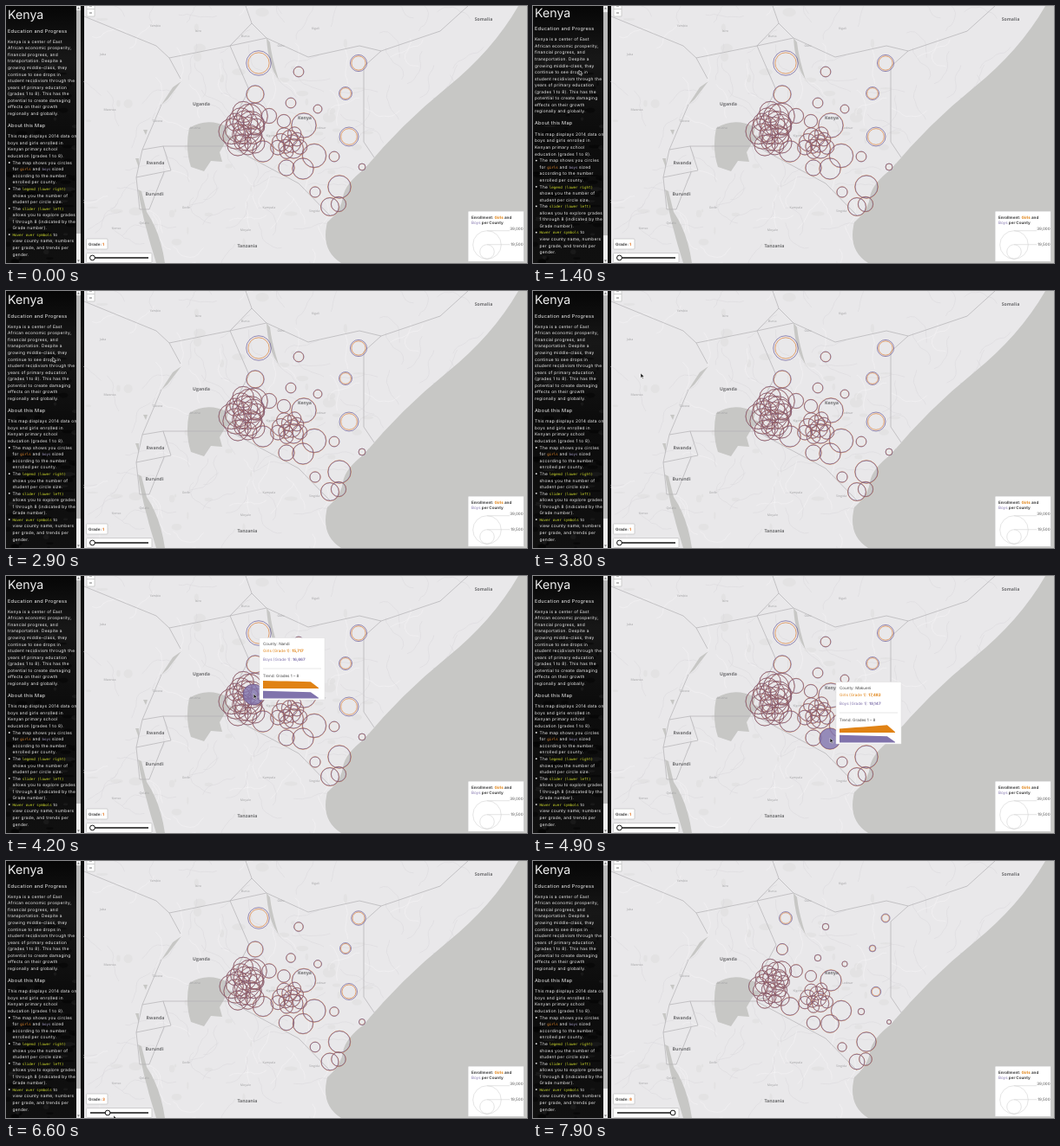
Write an HTML page that moves like this. It is 600 by 297 pixels and loops after 8000 ms.

```html
<!DOCTYPE html>
<html lang="en">
<head>
<meta charset="utf-8">
<title>Kenya: Education and Progress</title>
<style>
html, body { margin: 0; width: 100%; height: 100%; overflow: hidden; background: #000 }
svg { display: block; width: 600px; height: 297px; font-family: Inter, sans-serif; text-rendering: geometricPrecision }
.side { fill: #f0f0f0; font-size: 4.85px; letter-spacing: .25px }
.side .title { font-size: 14.2px; letter-spacing: 0 }
.side .h { font-size: 5.6px }
.side .small { font-size: 3.8px; letter-spacing: .1px }
.code { font: 4.2px "DejaVu Sans Mono", monospace; letter-spacing: 0 }
.place { font: 3.6px "Open Sans", sans-serif; fill: #a0a0a2; text-anchor: middle }
.country { font: bold 5.2px "Open Sans", sans-serif; fill: #6d6d6f; text-anchor: middle }
.water { fill: #c7c7c5 }
.line { fill: none; stroke-linejoin: round }
.box { fill: #fff; stroke: #c4c4c4; stroke-width: .8 }
.b { font-weight: 700 }
.girls { fill: #e08214 }
.boys { fill: #8073ac }
.ring { fill-opacity: 0; stroke-width: .9; stroke-opacity: .7 }
.ring.girls { stroke: #dd7626 }
.ring.boys { stroke: #5f4f92 }
.on { fill-opacity: .8 }
.ui { font-size: 4.55px; fill: #444 }
</style>
</head>
<body>
<svg viewBox="0 0 600 297">
  <defs>
    <linearGradient id="rock" x2="0" y2="1">
      <stop offset="0" stop-color="#060606"/><stop offset=".2" stop-color="#171717"/>
      <stop offset=".5" stop-color="#0c0c0c"/><stop offset="1" stop-color="#101010"/>
    </linearGradient>
    <clipPath id="panel"><path d="M0 0H81V297H0z"/></clipPath>
  </defs>
  <path fill="#e9e8ea" d="M90 0H600V297H90z"/>
  <g id="terrain"></g>
  <g class="water">
    <path d="M590 0Q560 52 508 94T412 189Q390 206 388 221T370 250Q362 282 386 297H600V0z"/>
    <path d="M211 141Q232 128 256 140L254 149 266 152 253 157 246 169 249 180 236 179 228 191 213 186Q206 165 211 141z"/>
    <path d="M300 37Q302 70 314 85 306 60 304 42z"/>
    <path d="M152 212Q158 250 173 297H183Q178 262 162 238L156 214z"/>
    <path d="M202 87 186 108 179 114 192 94zM158 143h5l-2 6zM149 176h4v11z"/>
  </g>
  <g class="line" stroke="#b2b1b4" stroke-width=".7">
    <path d="M256 142 280 97 258 46 300 37 348 59 407 46 432 52 412 70V157L424 175M432 52 500 29 532 0"/>
    <path d="M90 12 173 46 188 60 258 46 283 20 300 37M188 60 201 84M179 114 157 166 181 162H257L337 205 373 242"/>
    <path d="M181 162 190 190 150 198 157 166M150 198 154 235 165 235 182 192M283 20 276 0"/>
  </g>
  <g id="labels"></g>
  <g id="rings"></g>
  <g class="ui">
    <path class="box" d="M93 -4h9v16h-9zM93 3.5h9"/>
    <path stroke="#555" stroke-width=".8" d="M96 8h3M96 0h3"/>
    <rect class="box" x="92.5" y="269" width="24.5" height="12" rx="1"/>
    <text class="b" x="95" y="277">Grade: <tspan id="grade" fill="#e06a10"></tspan></text>
    <rect class="box" x="92.5" y="285.5" width="75.5" height="11" rx="1"/>
    <path stroke="#111" stroke-width="1.3" d="M97 291H164"/>
    <circle id="knob" cy="291" r="2.9" fill="#fff" stroke="#111"/>
    <rect class="box" x="532" y="237" width="64.5" height="58.5" rx="1"/>
    <text class="b" x="536" y="245.6">Enrollment: <tspan class="girls">Girls</tspan> and</text>
    <text x="536" y="252.2"><tspan class="boys">Boys</tspan> <tspan class="b">per County</tspan></text>
    <g class="line" stroke="#d2d2d2" stroke-width=".6">
      <circle cx="554" cy="276" r="16.3"/><circle cx="554" cy="284" r="8.3"/>
      <path d="M554 259.7H580M554 275.7H580"/>
    </g>
    <g text-anchor="end" fill="#555"><text x="595.5" y="259.4">39,000</text><text x="595.5" y="276.6">19,500</text></g>
  </g>
  <g id="tip" class="ui">
    <path fill="#fff" stroke="#ddd" stroke-width=".5" d="M0 0H75V71.5H0z"/>
    <text id="county" x="4" y="8"></text>
    <text class="girls" x="4" y="16.8">Girls (Grade 1): <tspan id="girlCount" class="b"></tspan></text>
    <text class="boys" x="4" y="26">Boys (Grade 1): <tspan id="boyCount" class="b"></tspan></text>
    <path stroke="#ccc" stroke-width=".5" d="M4 35.5H71"/>
    <text x="4" y="45.4">Trend: Grades 1 – 8</text>
    <path id="girlTrend" class="girls"/><path id="boyTrend" class="boys"/>
  </g>
  <path fill="url(#rock)" d="M0 0H89V297H0z"/>
  <g id="rocks"></g>
  <g clip-path="url(#panel)"><g id="side" class="side"></g></g>
  <path fill="#ececec" d="M81 0H86V297H81z"/>
  <path fill="#777" d="M82 3.4l1.5 -2 1.5 2zM82 293.6l1.5 2 1.5 -2z"/>
  <rect id="thumb" x="81" width="5" height="258" fill="#b9b9b9"/>
  <path id="cursor" d="M0 0V5.6L1.4 4.4 2.3 6.4 3.2 6 2.3 4.1H4z" fill="#111" stroke="#fff" stroke-width=".5"/>
</svg>
<script>
const $ = id => document.getElementById(id);
const add = (parent, tag, attrs, html = '') => {
  const el = document.createElementNS('http://www.w3.org/2000/svg', tag);
  for (const k in attrs) el.setAttribute(k, attrs[k]);
  el.innerHTML = html;
  return parent.appendChild(el);
};
let seed = 11;
const rnd = (a, b) => a + (b - a) * ((seed = seed * 16807 % 2147483647) / 2147483647);
const mix = (a, b, u) => a + (b - a) * u;

// Basemap: parks, roads and place names
const blob = (id, n, x, y, rx, ry, fill, opacity) => {
  while (n--) add($(id), 'ellipse', { cx: rnd(...x), cy: rnd(...y), rx: rnd(1, rx), ry: rnd(1, ry), fill, opacity });
};
blob('terrain', 45, [95, 420], [0, 297], 8, 6, '#e0e0e0', .7);
for (let i = 0; i < 120; i++) {
  let x = rnd(90, 520), y = rnd(0, 297), turn = rnd(0, 6.3), d = `M${x} ${y}`;
  for (let k = 0; k < 9; k++) {
    turn += rnd(-.6, .6);
    d += `L${x += 5 * Math.cos(turn)} ${y += 5 * Math.sin(turn)}`;
  }
  add($('terrain'), 'path', { d, class: 'line', stroke: i % 3 ? '#d8d7da' : '#f6f5f7', 'stroke-width': .5 });
}
const label = (cls, s, x, y) => add($('labels'), 'text', { class: cls, x, y: y + 1.7 }, s);
[['Somalia', 550, 15], ['Kenya', 344, 129], ['Uganda', 225, 113], ['Rwanda', 172, 181],
  ['Burundi', 171, 217], ['Tanzania', 278, 277]].forEach(c => label('country', ...c));
'Juba Yambio Isiro Bunia Gulu Kigali Mwanza Tabora Arusha Dodoma Kigoma Lodwar Konso Qelafo Gode Moyale Kampala Singida'
  .split(' ').forEach((s, i) => label('place', s, 120 + i % 6 * 48 + rnd(-12, 12), 35 + (i / 6 | 0) * 105 + rnd(-22, 22)));

// County rings: a few landmarks per region, dense clusters on a spiral
const rings = [];
const ring = (cx, cy, r, region, county) => {
  const circle = cls => add($('rings'), 'circle', { class: 'ring ' + cls, cx, cy });
  rings.push({ cx, cy, r, region, county, girl: circle('girls'), boy: circle('boys') });
};
const spiral = (n, cx, cy, rx, ry, rMin, rMax, region) => {
  for (let i = 0; i < n; i++) {
    const d = Math.sqrt((i + .5) / n), a = 2.4 * i;
    ring(cx + rx * d * Math.cos(a), cy + ry * d * Math.sin(a), rnd(rMin, rMax), region);
  }
};
// shrink: radius left at grade 8; share: girls' radius relative to boys'
const north = { shrink: .52, share: .85 }, dry = { shrink: .64, share: .95 };
const east = { shrink: .85, share: 1.03 }, west = { shrink: .76, share: .99 };
[[291, 66, 14.3], [406, 66, 9.6], [391, 101, 7.5], [395, 151, 11]].forEach(p => ring(...p, north));
[[337, 76, 6], [328, 112, 6], [359, 119, 5], [287, 102, 10.3], [378, 174, 6], [410, 186, 4]].forEach(p => ring(...p, dry));
[[384, 209, 13], [383, 229, 8.5], [373, 232, 10.3], [356, 215, 6], [355, 173, 13.5], [343, 138, 14], [323, 187, 9],
  [296, 168, 12], [320, 133, 7.5], [303, 127, 8.5]].forEach(p => ring(...p, east));
spiral(11, 326, 159, 15, 13, 7, 13, east);
spiral(19, 275, 144, 16, 24, 9, 16, west);
ring(285, 137, 12, west, { name: 'Nandi', girls: '15,717', boys: '16,667', start: 9, slope: -.2 });
ring(342, 188, 12, east, { name: 'Makueni', girls: '17,482', boys: '19,147', start: 4.5, slope: .7 });

// Sidebar
blob('rocks', 70, [0, 81], [60, 297], 8, 3, '#000', .4);
blob('rocks', 30, [0, 81], [60, 297], 8, 3, '#333', .3);
const row = (x, y, html, cls = '') => add($('side'), 'text', { x, y: y + 1.8, class: cls }, html);
const code = (s, color = '#d3e02c') => `<tspan class="code" fill="${color}">${s}</tspan>`;
const rows = (x, y, list) => list.forEach((s, i) => {
  if (s[0] === '*') add($('side'), 'circle', { cx: 3.8, cy: y + 7.55 * i, r: .9 });
  row(x, y + 7.55 * i, s.replace('*', ''));
});
row(2, 13.4, 'Kenya', 'title');
row(2, 29, 'Education and Progress', 'h');
rows(2, 41, ['Kenya is a center of East', 'African economic prosperity,', 'financial progress, and', 'transportation. Despite a',
  'growing middle-class, they', 'continue to see drops in', 'student recidivism through the', 'years of primary education',
  '(grades 1 to 8). This has the', 'potential to create damaging', 'effects on their growth', 'regionally and globally.']);
row(2, 138, 'About this Map', 'h');
rows(2, 150.5, ['This map displays 2014 data on', 'boys and girls enrolled in', 'Kenyan primary school', 'education (grades 1 to 8).']);
rows(7.5, 181, ['*The map shows you circles', `for ${code('girls', '#f09030')} and ${code('boys', '#a59cc4')} sized`,
  'according to the number', 'enrolled per county.', `*The ${code('legend (lower right)')}`, 'shows you the number of',
  'student per circle size.', `*The ${code('slider (lower left)')}`, 'allows you to explore grades', '1 through 8 (indicated by the',
  'Grade number).', `*${code('Hover over symbols')} to`, 'view county name, numbers', 'per grade, and trends per', 'gender.']);
['Map authored by Ned Harrowfield', 'References here', 'Data here'].forEach((s, i) => row(6, 305.5 + 6 * i, s, 'small'));

// Cursor stops: time, x, y
const stops = [[0, 68, 62], [1100, 53, 74], [3600, 54, 77], [4150, 285, 136], [4400, 287, 137], [4800, 342, 187],
  [5350, 343, 190], [6100, 101, 291], [6250, 104, 292], [6600, 124, 294], [7050, 164, 296], [8000, 166, 298]];
const ease = (t, a, b) => { const u = Math.min(1, Math.max(0, (t - a) / (b - a))); return u * u * (3 - 2 * u); };
const move = (id, x, y) => $(id).setAttribute('transform', `translate(${x} ${y})`);
const trend = (base, { start, slope }) => {
  let d = `M4 ${base}`;
  for (let i = 0; i < 8; i++) d += `L${4 + i * 64 / 7} ${base - (i < 7 ? start + slope * i : .8)}`;
  return d + `V${base}z`;
};

function draw() {
  const t = performance.now() % 8000;
  const scroll = ease(t, 1300, 1900) - ease(t, 2600, 2860);
  move('side', 0, -32 * scroll);
  $('thumb').setAttribute('y', 5 + 28 * scroll);

  const k = stops.findIndex(s => s[0] > t), [a, b] = [stops[k - 1], stops[k]];
  const u = ease(t, a[0], b[0]), x = mix(a[1], b[1], u), y = mix(a[2], b[2], u);
  move('cursor', x, y);
  $('cursor').style.display = t < 100 ? 'none' : '';

  // The knob follows the cursor in whole grades
  const step = t < 6100 ? 0 : Math.min(7, Math.floor((x - 99.5) / 8.8));
  $('grade').textContent = step + 1;
  $('knob').setAttribute('cx', 99.5 + 8.8 * step);

  const hover = rings.find(c => c.county && Math.hypot(x - c.cx, y - c.cy) < c.r);
  for (const c of rings) {
    const r = c.r * mix(1, c.region.shrink, step / 7);
    c.boy.setAttribute('r', r);
    c.girl.setAttribute('r', r * c.region.share);
    c.boy.classList.toggle('on', c === hover);
  }
  $('tip').style.display = hover ? '' : 'none';
  if (hover) {
    const { county } = hover;
    move('tip', hover.cx + 7, hover.cy - 65.5);
    $('county').textContent = 'County: ' + county.name;
    $('girlCount').textContent = county.girls;
    $('boyCount').textContent = county.boys;
    $('girlTrend').setAttribute('d', trend(58.5, county));
    $('boyTrend').setAttribute('d', trend(70, { start: 8.8, slope: -.25 }));
  }
  requestAnimationFrame(draw);
}
draw();
</script>
</body>
</html>
```
